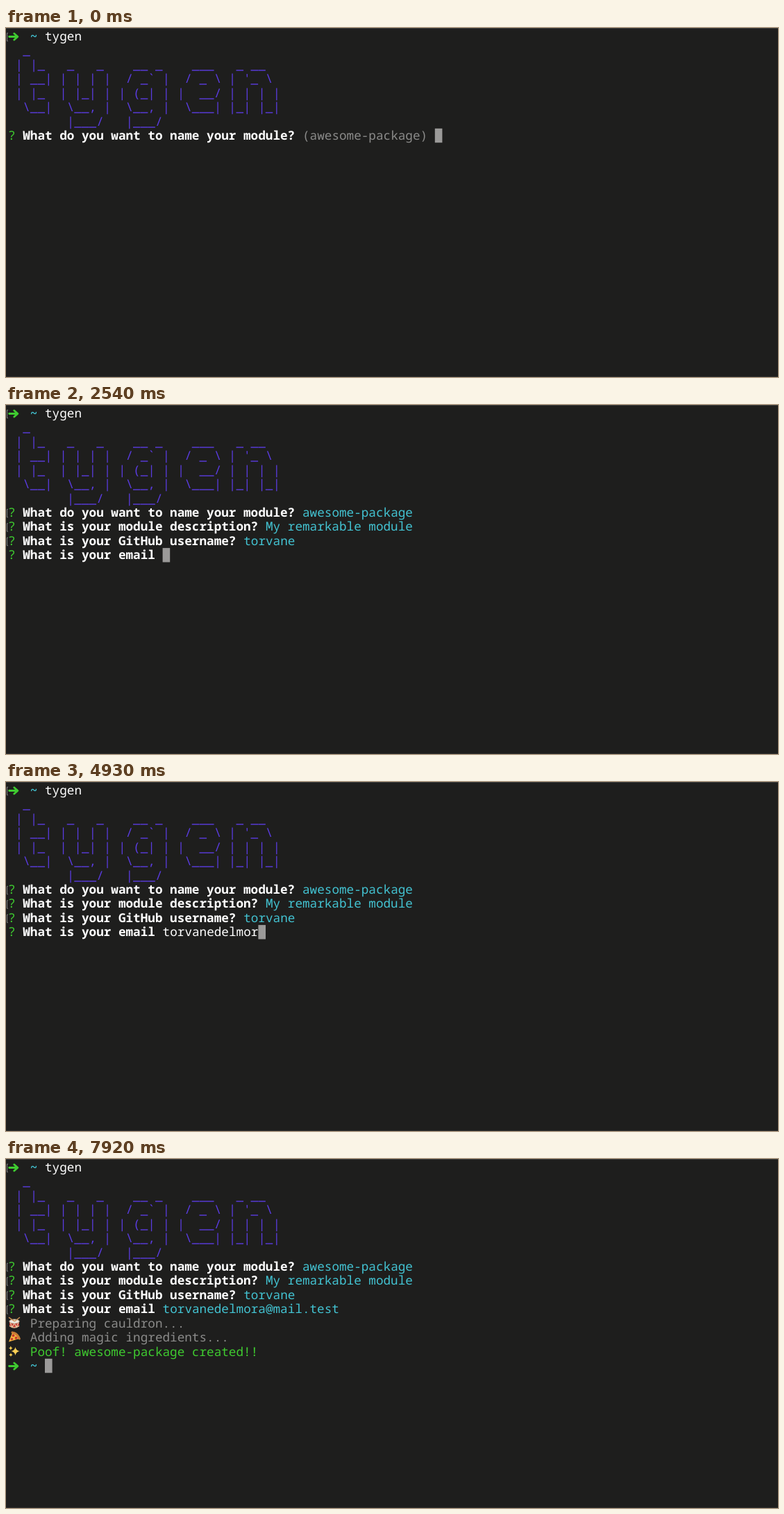
An HTML page that plays this animation: 1112x503 px, repeating every 8 s.

```html
<!DOCTYPE html>
<html lang="en">
<head>
<meta charset="utf-8">
<title>tygen</title>
<style>
  html, body { margin: 0; width: 100%; height: 100%; overflow: hidden; background: #1e1e1d; }
  svg { display: block; }
  text {
    font: 17.667px "Noto Sans Mono", "DejaVu Sans Mono", monospace;
    white-space: pre;
    text-rendering: geometricPrecision;
    fill: #fff;
  }
  .bold { font-weight: 700; }
  .green { fill: #3fcb30; }
  .cyan { fill: #43c3d2; }
  .grey { fill: #8b8b8a; }
  .banner { fill: #5a3ce0; }
  .cursor { fill: #9b9a99; }
  .mark { fill: none; stroke: #7d7d7c; }
  .arrow { fill: none; stroke: #3fcb30; stroke-width: 2.9; stroke-linecap: round; stroke-linejoin: round; }
</style>
</head>
<body>
<svg width="1112" height="503" viewBox="0 0 1112 503">
  <defs>
    <path id="mark" class="mark" d="M3 5.5H1.5V17H3"/>
    <path id="arrow" class="arrow" d="M4.6 10.7H16M11.8 6.2L16.8 10.7L11.8 15.2"/>
    <g id="drum">
      <path d="M5 7V14.5Q12 19.5 19 14.5V7Z" fill="#c93a35"/>
      <path d="M5 14Q12 19 19 14M6 9L9 16L12 10L15 16L18 9" fill="none" stroke="#e4c9a0" stroke-width="1.2"/>
      <ellipse cx="12" cy="7.5" rx="7.2" ry="3" fill="#efe9e0" stroke="#b9a58b"/>
      <path d="M4.5 2L12 7M19.5 2L13 7" stroke="#c98d52" stroke-width="1.5" stroke-linecap="round"/>
    </g>
    <g id="pizza">
      <path d="M4 16.5L9 3.5Q16 4.5 19 12Z" fill="#f3b13f"/>
      <path d="M9 3Q16.5 4 19.3 12" fill="none" stroke="#c97b35" stroke-width="3" stroke-linecap="round"/>
      <g fill="#c5392c"><circle cx="10.5" cy="7.5" r="1.9"/><circle cx="14.5" cy="11" r="1.9"/><circle cx="8.5" cy="12.5" r="1.7"/></g>
    </g>
    <path id="star" d="M0-6Q.9-.9 6 0Q.9.9 0 6Q-.9.9-6 0Q-.9-.9 0-6Z" fill="#f9cf55"/>
    <g id="sparkles">
      <use href="#star" x="13.5" y="9.5"/>
      <use href="#star" transform="translate(6.8 5) scale(.5)"/>
      <use href="#star" transform="translate(7 14.8) scale(.45)"/>
    </g>
  </defs>
  <path d="M0 .5H1112" stroke="#3d3d3c"/>
  <path d="M0 502.5H1112" stroke="#2e2e2d"/>
  <g id="header"></g>
  <g id="session"></g>
</svg>
<script>
const LOOP = 8000;
const LEFT = 3, TOP = 1.8, CELL = 10.6, LINE = 20.43, BASELINE = 16.2;
const FIRST_ROW = 7;

const banner = [
  "  _",
  " | |_   _   _    __ _    ___   _ __",
  " | __| | | | |  / _` |  / _ \\ | '_ \\",
  " | |_  | |_| | | (_| | |  __/ | | | |",
  "  \\__|  \\__, |  \\__, |  \\___| |_| |_|",
  "        |___/   |___/",
];

const questions = [
  { ask: "What do you want to name your module?", answer: "awesome-package", hint: "(awesome-package) " },
  { ask: "What is your module description?", answer: "My remarkable module", hint: "(My remarkable module) " },
  { ask: "What is your GitHub username?", answer: "torvane", hint: "" },
  { ask: "What is your email", answer: "torvanedelmora@mail.test", hint: "" },
];

const log = [
  ["drum", "grey", "Preparing cauldron..."],
  ["pizza", "grey", "Adding magic ingredients..."],
  ["sparkles", "green", "Poof! awesome-package created!!"],
];

// [ms, answered questions, typed characters]; -1 waits for the next question.
// Once all are answered, the last value counts log lines.
const steps = [
  [0, 0, 0], [600, 1, -1], [750, 1, 0], [1050, 2, 0],
  [1650, 2, 2], [1790, 2, 4], [1940, 2, 6], [2090, 2, 7],
  [2540, 3, 0],
  [3140, 3, 2], [3290, 3, 3], [3440, 3, 5], [3580, 3, 6], [3730, 3, 7],
  ...Array.from({ length: 7 }, (_, i) => [4180 + 150 * i, 3, 8 + i]),
  [5380, 3, 15],
  ...Array.from({ length: 4 }, (_, i) => [5830 + 150 * i, 3, 16 + i]),
  [6880, 3, 20], [7180, 3, 21], [7320, 3, 23], [7470, 3, 24],
  [7770, 4, 1], [7920, 4, 3],
];

const colX = col => LEFT + col * CELL;
const rowY = row => TOP + row * LINE;
const text = (row, col, style, content) =>
  `<text x="${colX(col)}" y="${rowY(row) + BASELINE}" class="${style}">${content}</text>`;
const icon = (row, id) => `<use href="#${id}" y="${rowY(row)}"/>`;
const cursor = (row, col) =>
  `<rect class="cursor" x="${colX(col)}" y="${rowY(row)}" width="${CELL}" height="${LINE}"/>`;
const shellPrompt = row => icon(row, "arrow") + text(row, 3, "bold cyan", "~");
const question = (row, ask) => text(row, 0, "green", "?") + text(row, 2, "bold", ask);
const replyCol = ask => ask.length + 3;

function session(answered, count) {
  let out = "";
  questions.slice(0, answered).forEach(({ ask, answer }, i) => {
    const row = FIRST_ROW + i;
    out += icon(row, "mark") + question(row, ask) + text(row, replyCol(ask), "cyan", answer);
  });

  const row = FIRST_ROW + answered;
  if (answered < questions.length) {
    if (count < 0) return out + cursor(row, 0);
    const { ask, answer, hint } = questions[answered];
    const reply = count ? answer.slice(0, count) : hint;
    const col = replyCol(ask);
    return out + question(row, ask) + text(row, col, count ? "" : "grey", reply)
      + cursor(row, col + reply.length);
  }

  log.slice(0, count).forEach(([id, style, content], i) => {
    out += icon(row + i, id) + text(row + i, 3, style, content);
  });
  const end = row + count;
  return out + (count < log.length ? cursor(end, 0) : shellPrompt(end) + cursor(end, 5));
}

document.getElementById("header").innerHTML =
  icon(0, "mark") + shellPrompt(0) + text(0, 5, "", "tygen")
  + banner.map((line, i) => text(i + 1, 0, "banner", line)).join("");

const screen = document.getElementById("session");
let shown;

function tick() {
  const time = performance.now() % LOOP;
  const step = steps.findLast(([start]) => start <= time);
  if (step !== shown) {
    shown = step;
    screen.innerHTML = session(step[1], step[2]);
  }
  requestAnimationFrame(tick);
}
tick();
</script>
</body>
</html>
```
